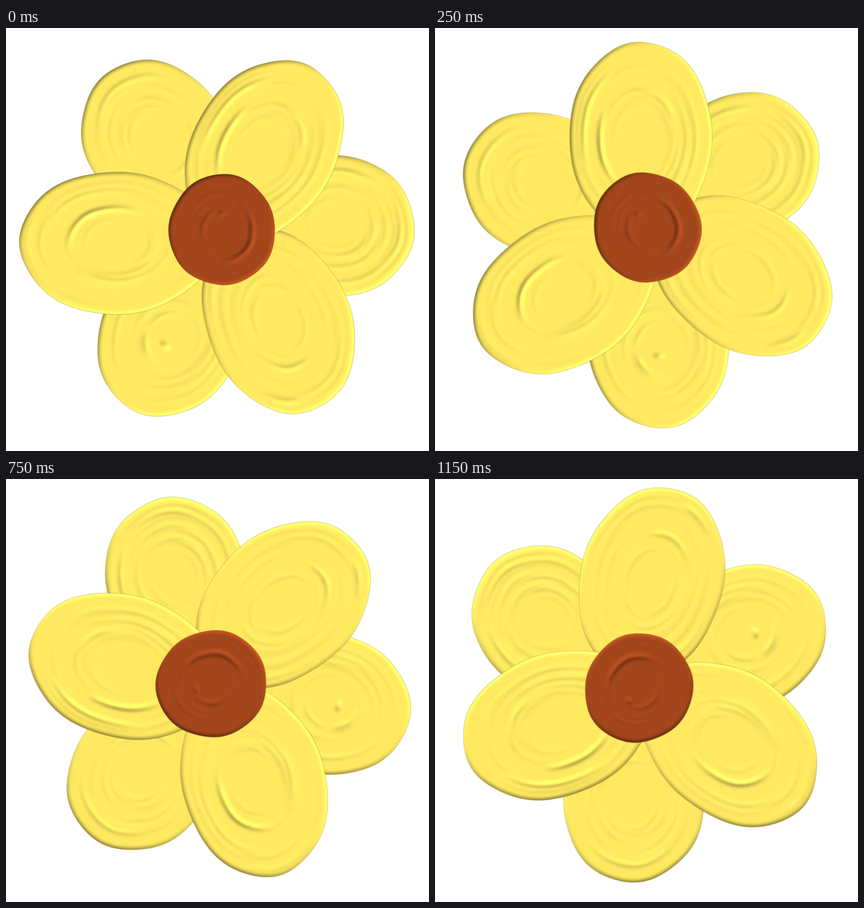
Animation of 748 by 748 pixels, one loop 1250 ms. Source, as an HTML page with a canvas:

```html
<!DOCTYPE html>
<html lang="en">
<head>
<meta charset="utf-8">
<title>Turning flower</title>
<style>
  html, body { margin: 0; width: 100%; height: 100%; overflow: hidden; background: #fff; }
  canvas { display: block; }
</style>
</head>
<body>
<canvas id="stage" width="748" height="748"></canvas>
<script>
const SIZE = 748, STEP = 250, RAD = Math.PI / 180;
const YELLOW = [255, 233, 97], BROWN = [163, 70, 28];

// Each pose: where the flower's pivot lies, and its turn in degrees.
const PIVOT = [359, 400.6];
const POSES = [
  [359, 400.6, 0],
  [378.2, 402.2, -31.5],
  [398.2, 393.4, -65.4],
  [411.8, 372.4, -106.2],
  [405.4, 350, -141.5]
];

function layer() {
  const c = document.createElement('canvas');
  c.width = c.height = SIZE;
  return c.getContext('2d', { willReadFrequently: true });
}
const flower = layer(), height = layer(), relief = layer();

let seed = 11;
const rand = (lo, hi) => {
  seed = (seed * 16807) % 2147483647;
  return lo + (hi - lo) * seed / 2147483647;
};

// A slightly uneven ellipse; returns (scale, degrees from the tip) -> [x, y].
function oval(x, y, turn, long, wide) {
  const cos = Math.cos(turn * RAD), sin = Math.sin(turn * RAD);
  const p = rand(0, 6), q = rand(0, 6);
  return (scale, deg) => {
    const u = deg * RAD;
    const r = scale * (1 + 0.01 * Math.sin(3 * u + p) + 0.006 * Math.sin(7 * u + q));
    const along = r * long * Math.cos(u), across = r * wide * Math.sin(u);
    return [x + along * cos - across * sin, y + along * sin + across * cos];
  };
}

// A raised brush mark along an inner ring, fading out at both ends.
function ridge(point, scale, from, to, strength) {
  const count = 50;
  height.lineWidth = 4;
  for (let i = 0; i < count; i++) {
    const fade = Math.sin(Math.PI * (i + 0.5) / count);
    height.strokeStyle = `rgba(255,255,255,${strength * fade})`;
    height.beginPath();
    height.moveTo(...point(scale, from + (to - from) * i / count));
    height.lineTo(...point(scale, from + (to - from) * (i + 1) / count));
    height.stroke();
  }
}

// Lights the height layer from the lower right.
function emboss(color) {
  relief.clearRect(0, 0, SIZE, SIZE);
  relief.filter = 'blur(3.2px)';
  relief.drawImage(height.canvas, 0, 0);
  relief.filter = 'none';
  const src = relief.getImageData(0, 0, SIZE, SIZE).data;
  const out = relief.createImageData(SIZE, SIZE);
  const diagonal = 4 * (SIZE + 1);
  for (let i = diagonal; i < src.length - diagonal; i += 4) {
    const slope = (src[i - diagonal] - src[i + diagonal]) * 0.011;
    const light = 1 + (slope > 0 ? slope * 0.6 : slope);
    for (let k = 0; k < 3; k++) out.data[i + k] = color[k] * light;
    out.data[i + 3] = 255;
  }
  relief.putImageData(out, 0, 0);
}

// Marks are [scale, from, to, strength]; the finer brushwork is random.
function paint(color, point, rings, marks) {
  const path = new Path2D();
  for (let deg = 0; deg < 360; deg += 3) path.lineTo(...point(1, deg));
  path.closePath();

  height.fillStyle = '#000';
  height.fillRect(0, 0, SIZE, SIZE);
  height.fillStyle = 'rgb(105,105,105)';
  height.fill(path);
  for (let i = 0; i < rings; i++) {
    const from = rand(0, 360);
    ridge(point, 0.92 - 0.65 * i / rings, from, from + rand(80, 200), rand(0.08, 0.25));
  }
  for (const mark of marks) ridge(point, ...mark);
  emboss(color);

  flower.save();
  flower.clip(path);
  flower.drawImage(relief.canvas, 0, 0);
  flower.restore();
  flower.strokeStyle = 'rgba(90,75,20,.3)';
  flower.stroke(path);
}

const back = (x, y, turn, ...marks) => paint(YELLOW, oval(x, y, turn, 140, 124), 12, marks);
const front = (x, y, turn, ...marks) => paint(YELLOW, oval(x, y, turn, 172, 126), 14, marks);

back(263, 192, -128.5, [0.78, -50, 60, 0.35]);
back(583, 351, 0, [0.78, -105, -45, 0.6], [0.83, -30, 40, 0.4]);
back(289, 550, 121.5, [0.33, -10, 80, 0.6], [0.1, -40, 40, 0.9]);
front(195, 380, 180, [0.48, -8, 122, 0.8], [0.54, -130, -40, 0.35]);
front(481, 517, 65.4, [0.52, -25, 70, 0.45], [0.87, 10, 45, 0.5]);
front(455, 217, -58.5, [0.57, -145, -60, 0.8], [0.8, -115, -30, 0.6], [0.49, -20, 70, 0.45]);
paint(BROWN, oval(382, 357, 0, 94, 98), 5,
  [[0.58, -85, 95, 0.9], [0.36, 90, 270, 0.4], [0.29, -105, -80, 0.9]]);

const stage = document.getElementById('stage').getContext('2d');
stage.imageSmoothingQuality = 'high';

function draw() {
  const [x, y, turn] = POSES[Math.floor(performance.now() / STEP) % POSES.length];
  stage.resetTransform();
  stage.fillStyle = '#fff';
  stage.fillRect(0, 0, SIZE, SIZE);
  stage.translate(x, y);
  stage.rotate(turn * RAD);
  stage.drawImage(flower.canvas, -PIVOT[0], -PIVOT[1]);
  requestAnimationFrame(draw);
}
draw();
</script>
</body>
</html>
```
